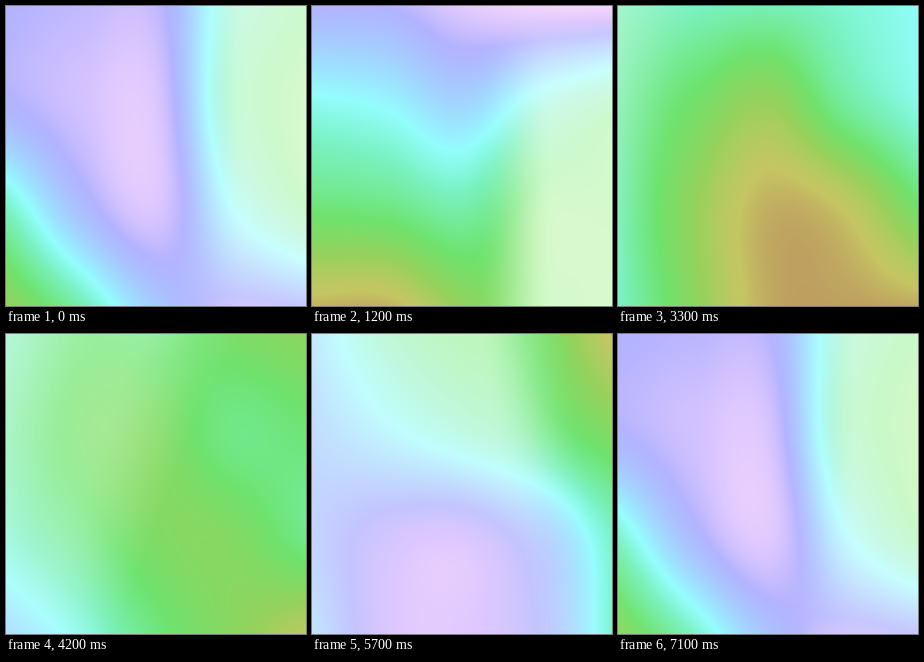
These frames come from a looping animation (300 px wide and 300 px high, 7.2 s). An HTML page with a canvas:

```html
<!DOCTYPE html>
<html lang="en">
<head>
<meta charset="utf-8">
<title>Drifting pastel gradient</title>
<style>
  html, body { margin: 0; width: 100%; height: 100%; overflow: hidden; }
  canvas { display: block; width: 300px; height: 300px; }
</style>
</head>
<body>
<canvas id="stage" width="300" height="300"></canvas>
<script>
const SIZE = 300, LOOP = 7200, STEP = 100;
const COLS = 5, ROWS = 4;

// hue: control mesh, row by row. pale: [edge x at y=100, facing angle, softness, strength]
const poses = [
  { at: 0, pale: [202, 0, 80, 1], hue: [
    240, 247, 247, 158, 122,
    236, 256, 262, 145, 105,
    157, 228, 262, 180, 120,
    90, 148, 216, 248, 240] },
  { at: 1200, pale: [203, 0, 80, 1], hue: [
    238, 240, 266, 283, 285,
    172, 182, 205, 165, 130,
    125, 130, 147, 112, 110,
    50, 50, 92, 110, 105] },
  { at: 2000, pale: [265, 0, 90, 1], hue: [
    215, 232, 240, 262, 280,
    156, 145, 149, 172, 165,
    115, 77, 67, 110, 108,
    80, 48, 42, 62, 92] },
  { at: 3300, pale: [5, 195, 120, 0.6], hue: [
    150, 155, 150, 163, 177,
    145, 115, 88, 138, 170,
    150, 93, 49, 62, 118,
    158, 98, 46, 40, 45] },
  { at: 4900, pale: [150, 200, 120, 0.8], hue: [
    165, 114, 118, 85, 48,
    152, 125, 130, 130, 90,
    175, 171, 168, 155, 145,
    230, 228, 202, 160, 98] },
  { at: 5700, pale: [225, 170, 90, 0.85], hue: [
    200, 146, 118, 114, 57,
    215, 188, 160, 135, 105,
    222, 252, 260, 222, 156,
    205, 260, 266, 240, 160] }
];

// hue, saturation, lightness
const ramp = [
  [40, .42, .56], [60, .46, .58], [90, .56, .59], [120, .67, .66], [155, .81, .71],
  [180, .96, .785], [210, 1, .82], [240, 1, .85], [262, 1, .89], [285, .87, .915]
];
const PALE_LIGHT = .89, PALE_SAT = .8, PER_DEGREE = 4, MAX_HUE = 320;

const clamp = (v, lo, hi) => Math.min(hi, Math.max(lo, v));
const mix = (a, b, k) => a + (b - a) * k;

function hslToRgb(h, s, l) {
  const a = s * Math.min(l, 1 - l);
  return [0, 8, 4].map(n => {
    const k = (n + h / 30) % 12;
    return 255 * (l - a * Math.max(-1, Math.min(k - 3, 9 - k, 1)));
  });
}

function toneAt(h) {
  let i = 0;
  while (i < ramp.length - 2 && h > ramp[i + 1][0]) i++;
  const a = ramp[i], b = ramp[i + 1];
  const k = clamp((h - a[0]) / (b[0] - a[0]), 0, 1);
  return [mix(a[1], b[1], k), mix(a[2], b[2], k)];
}

const deep = new Float32Array(MAX_HUE * PER_DEGREE * 3);
const pastel = new Float32Array(deep.length);
for (let i = 0; i < MAX_HUE * PER_DEGREE; i++) {
  const h = i / PER_DEGREE, [s, l] = toneAt(h);
  deep.set(hslToRgb(h, s, l), i * 3);
  pastel.set(hslToRgb(h, Math.max(s, PALE_SAT), Math.max(l, PALE_LIGHT)), i * 3);
}

// Cubic through evenly spaced values, extended in a straight line past the ends
function spline(values, u) {
  const last = values.length - 1;
  const i = Math.min(Math.floor(u), last - 1), k = u - i;
  const b = values[i], c = values[i + 1];
  const a = i > 0 ? values[i - 1] : 2 * b - c;
  const d = i + 2 <= last ? values[i + 2] : 2 * c - b;
  return b + .5 * k * (c - a + k * (2 * a - 5 * b + 4 * c - d + k * (3 * (b - c) + d - a)));
}

function buildFields({ hue, pale }) {
  const hues = new Float32Array(SIZE * SIZE), pales = new Float32Array(SIZE * SIZE);
  const [edge, degrees, soft, strength] = pale;
  const dx = Math.cos(degrees * Math.PI / 180), dy = Math.sin(degrees * Math.PI / 180);
  for (let x = 0; x < SIZE; x++) {
    const u = x / SIZE * (COLS - 1);
    const column = Array.from({ length: ROWS },
      (_, r) => spline(hue.slice(r * COLS, (r + 1) * COLS), u));
    for (let y = 0; y < SIZE; y++) {
      const k = clamp(((x - edge) * dx + (y - 100) * dy) / soft + .5, 0, 1);
      hues[y * SIZE + x] = spline(column, y / SIZE * (ROWS - 1));
      pales[y * SIZE + x] = strength * k * k * (3 - 2 * k);
    }
  }
  return { hues, pales };
}

const fields = poses.map(buildFields);
const count = poses.length;
const poseTime = i => poses[(i + count) % count].at + Math.floor(i / count) * LOOP;

// Weights of the four poses around a moment, for a smooth cyclic curve
function timeWeights(time) {
  let i = count - 1;
  while (poses[i].at > time) i--;
  const [t0, t1, t2, t3] = [i - 1, i, i + 1, i + 2].map(poseTime);
  const span = t2 - t1, k = (time - t1) / span;
  const rise = k * k * (3 - 2 * k);
  const leave = k * (1 - k) * (1 - k) * span / (t2 - t0);
  const arrive = k * k * (k - 1) * span / (t3 - t1);
  return {
    near: [i - 1, i, i + 1, i + 2].map(n => fields[(n + count) % count]),
    weights: [-leave, 1 - rise - arrive, rise + leave, arrive]
  };
}

const ctx = document.getElementById("stage").getContext("2d");
const picture = ctx.createImageData(SIZE, SIZE);

function draw(time) {
  const { near: [a, b, c, d], weights: [wa, wb, wc, wd] } = timeWeights(time);
  const data = picture.data;
  for (let i = 0, p = 0; i < SIZE * SIZE; i++, p += 4) {
    const h = a.hues[i] * wa + b.hues[i] * wb + c.hues[i] * wc + d.hues[i] * wd;
    const k = clamp(a.pales[i] * wa + b.pales[i] * wb + c.pales[i] * wc + d.pales[i] * wd, 0, 1);
    const n = Math.round(clamp(h, 38, MAX_HUE - 1) * PER_DEGREE) * 3;
    for (let ch = 0; ch < 3; ch++) data[p + ch] = mix(deep[n + ch], pastel[n + ch], k);
    data[p + 3] = 255;
  }
  ctx.putImageData(picture, 0, 0);
}

const start = performance.now();
let shown = -1;
function tick() {
  const elapsed = Math.max(0, performance.now() - start) % LOOP;
  const moment = Math.floor(elapsed / STEP) * STEP;
  if (moment !== shown) draw(shown = moment);
  requestAnimationFrame(tick);
}
tick();
</script>
</body>
</html>
```
